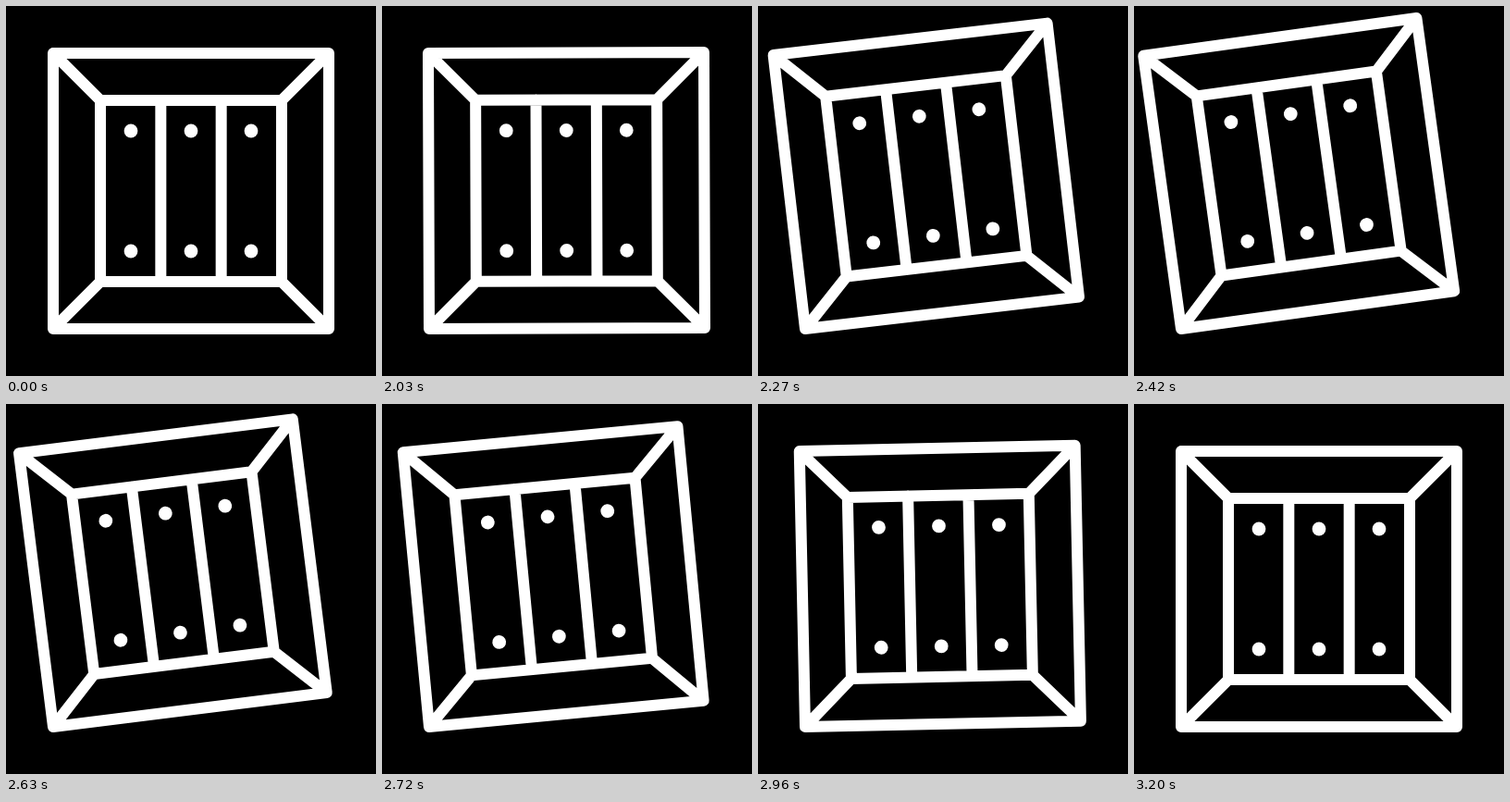
An HTML page with a canvas for the animation above (3230 ms loop, 400x400 px).

```html
<!DOCTYPE html>
<html lang="en">
<head>
<meta charset="utf-8">
<title>Tipping crate</title>
<style>
  html, body { margin: 0; width: 100%; height: 100%; overflow: hidden; background: #000; }
  canvas { display: block; width: 400px; height: 400px; }
</style>
</head>
<body>
<canvas id="stage" width="400" height="400"></canvas>
<script>
const ctx = document.getElementById('stage').getContext('2d');

const LOOP = 3230, STEP = 30;
const MOVE_START = 2030, MOVE_END = 3200;
const LIFT_START = 2010, DROP_START = 2503;
const FALL_TIME = 383, BOUNCE_HALF = 186;
const MAX_TILT = 8;

const OUTER = [51, 349], INNER = [102, 298];

const bezier = (a, b, s) => 3 * a * s * (1 - s) ** 2 + 3 * b * s * s * (1 - s) + s ** 3;

// Equivalent to cubic-bezier(.25, .1, .25, 1)
function ease(x) {
  let low = 0, high = 1;
  for (let i = 0; i < 24; i++) {
    const mid = (low + high) / 2;
    if (bezier(0.25, 0.25, mid) < x) low = mid; else high = mid;
  }
  return bezier(0.1, 1, low);
}

// Tilt in degrees: eased lift, free fall, then one bounce cut off by the loop
function tiltAt(time) {
  if (time < MOVE_START || time >= MOVE_END) return 0;
  const t = MOVE_START + Math.floor((time - MOVE_START) / STEP) * STEP;
  if (t < DROP_START) {
    return MAX_TILT * ease((t - LIFT_START) / (DROP_START - LIFT_START));
  }
  const fall = t - DROP_START;
  if (fall < FALL_TIME) return MAX_TILT * (1 - (fall / FALL_TIME) ** 2);
  const fromPeak = fall - FALL_TIME - BOUNCE_HALF;
  return MAX_TILT * Math.max(0, BOUNCE_HALF ** 2 - fromPeak ** 2) / FALL_TIME ** 2;
}

function line(x1, y1, x2, y2) {
  ctx.moveTo(x1, y1);
  ctx.lineTo(x2, y2);
}

function drawCrate() {
  const [o1, o2] = OUTER, [i1, i2] = INNER;
  const plank = (i2 - i1) / 3;

  ctx.beginPath();
  ctx.rect(o1, o1, o2 - o1, o2 - o1);
  ctx.rect(i1, i1, i2 - i1, i2 - i1);
  line(o1, o1, i1, i1);
  line(o2, o1, i2, i1);
  line(o1, o2, i1, i2);
  line(o2, o2, i2, i2);
  for (const n of [1, 2]) line(i1 + n * plank, i1, i1 + n * plank, i2);
  ctx.stroke();

  for (const x of [135, 200, 265]) {
    for (const y of [135, 265]) {
      ctx.beginPath();
      ctx.arc(x, y, 7.4, 0, Math.PI * 2);
      ctx.fill();
    }
  }
}

function render(time) {
  ctx.setTransform(1, 0, 0, 1, 0, 0);
  ctx.fillStyle = '#000';
  ctx.fillRect(0, 0, 400, 400);

  // The crate pivots on its lower left corner
  const [px, py] = OUTER;
  ctx.translate(px, py);
  ctx.rotate(-tiltAt(time) * Math.PI / 180);
  ctx.translate(-px, -py);

  ctx.fillStyle = ctx.strokeStyle = '#fff';
  ctx.lineWidth = 12;
  ctx.lineJoin = ctx.lineCap = 'round';
  drawCrate();
}

const start = performance.now();
function tick() {
  render((performance.now() - start) % LOOP);
  requestAnimationFrame(tick);
}
tick();
</script>
</body>
</html>
```
